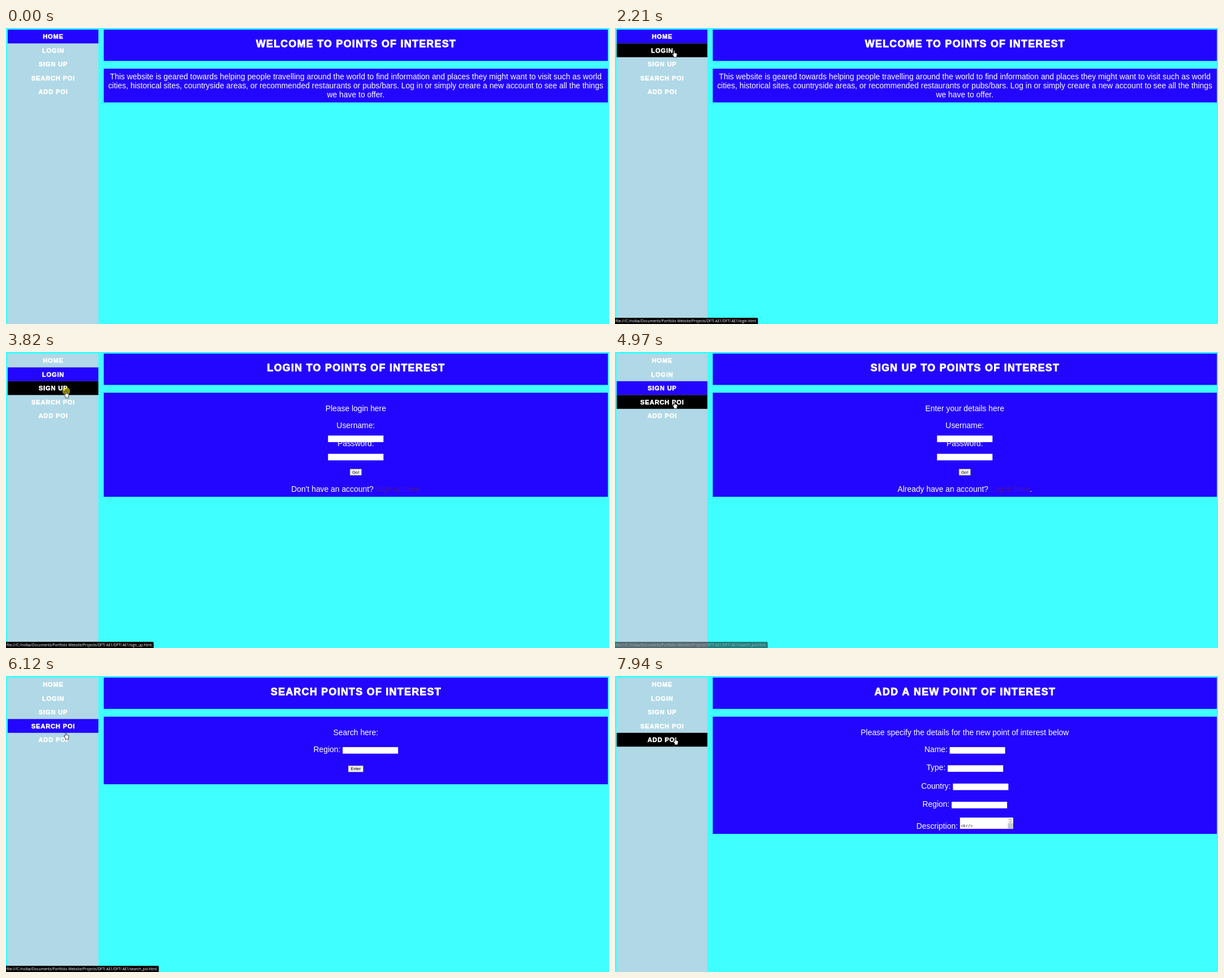
Write an HTML page with a canvas that moves like this. It is 1066 by 525 pixels and loops after 8000 ms.

```html
<!DOCTYPE html>
<html lang="en">
<head>
<meta charset="utf-8">
<title>Points of Interest</title>
<style>
  html, body { margin: 0; width: 100%; height: 100%; overflow: hidden; background: #40ffff; }
  canvas { display: block; }
</style>
</head>
<body>
<canvas id="stage" width="1066" height="525"></canvas>
<script>
const ctx = document.getElementById('stage').getContext('2d', { alpha: false });
const LOOP = 8000, STEP = 70;
const CYAN = '#40ffff', BLUE = '#2306ff', SIDE = '#b0d8e6', LINK = '#4816a6';
const SANS = '"Liberation Sans", Arial, sans-serif';
const BODY = '13.88px ' + SANS;
const MID = 618.3;
const NAV = ['HOME', 'LOGIN', 'SIGN UP', 'SEARCH POI', 'ADD POI'];
const NAV_TOP = 2.8, NAV_ROW = 24.5;

const field = { w: 98, draw: (x, y) => rect(x, y - 8.7, 98, 11.6, '#fff') };
const area = { w: 94, draw: drawArea };
const link = text => ({ text, color: LINK });
const account = (intro, ...rest) => [
  [104.8, intro], [134.8, 'Username:'], [156.9, field], [167, 'Password:'],
  [189.3, field], [247.7, ...rest]
];

// Each page: start time, active menu row, title, panel bottom, text rows, button
const PAGES = [
  { at: 0, row: 0, title: 'WELCOME TO POINTS OF INTEREST', bottom: 132, rows: [
    [90.8, 'This website is geared towards helping people travelling around the world to find information and places they might want to visit such as world'],
    [106.9, 'cities, historical sites, countryside areas, or recommended restaurants or pubs/bars. Log in or simply creare a new account to see all the things'],
    [123, 'we have to offer.']] },
  { at: 2280, row: 1, title: 'LOGIN TO POINTS OF INTEREST', bottom: 256.8, button: ['Go!', 207.2, 21],
    rows: account('Please login here', "Don't have an account? ", link('Sign up here')) },
  { at: 3960, row: 2, title: 'SIGN UP TO POINTS OF INTEREST', bottom: 256.8, button: ['Go!', 207.2, 21],
    rows: account('Enter your details here', 'Already have an account? ', link('Log in here'), '.') },
  { at: 5450, row: 3, title: 'SEARCH POINTS OF INTEREST', bottom: 192, button: ['Enter', 158.8, 27],
    rows: [[104.8, 'Search here:'], [134.8, 'Region: ', field]] },
  { at: 7140, row: -1, title: 'ADD A NEW POINT OF INTEREST', bottom: 280, rows: [
    [104.8, 'Please specify the details for the new point of interest below'],
    [134.8, 'Name: ', field], [167, 'Type: ', field], [199.5, 'Country: ', field],
    [231.8, 'Region: ', field], [271.3, 'Description: ', area]] }
];

// Pointer moves: start, last step, steps, target x, y
const MOVES = [
  [230, 440, 4, 361, 204], [640, 1120, 8, 107, 62], [1320, 1460, 3, 104.5, 39.5],
  [2540, 2820, 5, 106, 69], [4220, 4830, 9, 105, 88], [5710, 6470, 11, 106.5, 109.5]
];
const CLICKS = [[2140, 2210], [3820, 3890], [5310, 5380], [6930, 7070]];

// Status bar: file, fade-in start, fade-out start, fade-out steps
const LINKS = [
  ['login', 1390, 2750, 2], ['sign_up', 3020, 4570, 2],
  ['search_poi', 4970, 6330, 2], ['add_poi', 6600, 7340, 4]
];

const HAND = new Path2D('M-.9 .9Q0-.5 .9 .9V4.6L4.3 5.4Q5.3 5.8 5.3 7L4.5 10V12.4H-.9V10.6L-3.3 7.2Q-3.2 5.8-1.9 6.4L-.9 7.3Z');
const ARROW = new Path2D('M0 0V9.2L2.1 7.3L3.6 10.8L5.2 10.1L3.7 6.7H6.6Z');

function rect(x, y, w, h, color) {
  ctx.fillStyle = color;
  ctx.fillRect(x, y, w, h);
}

function text(str, x, y, font, color) {
  ctx.font = font;
  ctx.fillStyle = color;
  ctx.fillText(str, x, y);
}

// Extra heavy capitals: bold face thickened by an outline
function heavy(str, cx, y, size) {
  ctx.font = `bold ${size}px ${SANS}`;
  ctx.letterSpacing = size * 0.075 + 'px';
  ctx.lineWidth = size * 0.05;
  ctx.strokeStyle = ctx.fillStyle = '#fff';
  const x = cx - (ctx.measureText(str).width - size * 0.075) / 2;
  ctx.fillText(str, x, y);
  ctx.strokeText(str, x, y);
  ctx.letterSpacing = '0px';
}

function drawRow([y, ...parts]) {
  ctx.font = BODY;
  const items = parts.map(p => {
    const item = typeof p === 'string' ? { text: p, color: '#fff' } : p;
    return { ...item, w: item.w || ctx.measureText(item.text).width };
  });
  let x = MID - items.reduce((sum, i) => sum + i.w, 0) / 2;
  for (const i of items) {
    if (i.draw) i.draw(x, y);
    else text(i.text, x, y, BODY, i.color);
    x += i.w;
  }
}

function drawArea(x, y) {
  const top = y - 20.2;
  rect(x, top, 94, 20, '#fff');
  text('<br/>', x + 1.6, y - 3.2, '6.9px "DejaVu Sans Mono", monospace', '#222');
  rect(x + 84.5, top, 9.5, 10, '#eee');
  rect(x + 84.5, top + 10, 9.5, 10, '#c4c8d0');
  ctx.strokeStyle = '#555';
  ctx.lineWidth = 0.8;
  ctx.beginPath();
  for (const [yy, d] of [[4, -1.5], [7, 1.5]]) {
    ctx.moveTo(x + 87.6, top + yy);
    ctx.lineTo(x + 89.2, top + yy + d);
    ctx.lineTo(x + 90.8, top + yy);
  }
  ctx.stroke();
}

function drawButton([label, y, w]) {
  const x = MID - w / 2, font = '7.4px ' + SANS;
  rect(x, y, w, 11.8, '#767676');
  rect(x + 0.6, y + 0.6, w - 1.2, 10.6, '#efefef');
  ctx.font = font;
  text(label, MID - ctx.measureText(label).width / 2, y + 8.5, font, '#000');
}

function pointerAt(t) {
  let x = 1077, y = 524;
  for (const [start, end, n, tx, ty] of MOVES) {
    if (t < start) break;
    const gap = (end - start) / (n - 1);
    const p = Math.min(1, (Math.floor((t - start) / gap + 1e-6) + 1) / n);
    x += (tx - x) * p;
    y += (ty - y) * p;
  }
  return { x, y };
}

function drawMenu(active, hover) {
  rect(3, 3, 160.3, 522, SIDE);
  NAV.forEach((label, i) => {
    const y = NAV_TOP + i * NAV_ROW;
    if (i === active || i === hover) rect(3, y, 160.3, NAV_ROW, i === active ? BLUE : '#000');
    heavy(label, 83.1, y + 16.6, 11.1);
  });
}

function drawPage(page) {
  rect(172.8, 2.8, 891.2, 55.6, BLUE);
  heavy(page.title, MID, 34.2, 17.77);
  rect(172.8, 72.2, 891.2, page.bottom - 72.2, BLUE);
  page.rows.forEach(drawRow);
  if (page.button) drawButton(page.button);
}

function drawStatus(t) {
  const steps = from => Math.floor((t - from) / STEP) + 1;
  for (const [file, show, hide, n] of LINKS) {
    const alpha = Math.min(1, steps(show) / 2, t < hide ? 1 : 1 - steps(hide) / n);
    if (t < show || alpha <= 0) continue;
    const url = `file:///C:/nolba/Documents/Portfolio Website/Projects/DFTI AE1/DFTI AE1/${file}.html`;
    const font = '6.4px "Open Sans", "Noto Sans", sans-serif';
    ctx.globalAlpha = alpha;
    ctx.font = font;
    ctx.fillStyle = '#000';
    ctx.beginPath();
    ctx.roundRect(0, 514, ctx.measureText(url).width + 4.5, 11, [0, 2, 0, 0]);
    ctx.fill();
    text(url, 1, 522.2, font, '#fff');
    ctx.globalAlpha = 1;
  }
}

function drawPointer(t, { x, y }, hand) {
  if (CLICKS.some(([a, b]) => t >= a && t < b)) {
    ctx.fillStyle = 'rgba(255,240,0,.55)';
    ctx.beginPath();
    ctx.arc(106.5, y + 0.4, 6.8, 0, 7);
    ctx.fill();
  }
  const shape = hand ? HAND : ARROW;
  ctx.save();
  ctx.translate(x, y);
  ctx.fillStyle = '#fff';
  ctx.strokeStyle = '#000';
  ctx.lineWidth = 0.7;
  ctx.fill(shape);
  ctx.stroke(shape);
  ctx.restore();
}

function draw(t) {
  const page = PAGES.findLast(p => t >= p.at);
  const pos = pointerAt(t);
  const row = Math.floor((pos.y - NAV_TOP) / NAV_ROW);
  const hover = t >= 230 && pos.x < 163 && row < NAV.length ? row : -1;
  const waiting = t >= 7000 && t < 7810;
  rect(0, 0, 1066, 525, CYAN);
  drawMenu(page.row, hover);
  drawPage(page);
  drawStatus(t);
  if (t >= 230) drawPointer(t, pos, hover >= 0 && !waiting);
}

const begin = performance.now();
function tick() {
  draw((performance.now() - begin) % LOOP);
  requestAnimationFrame(tick);
}
tick();
</script>
</body>
</html>
```
